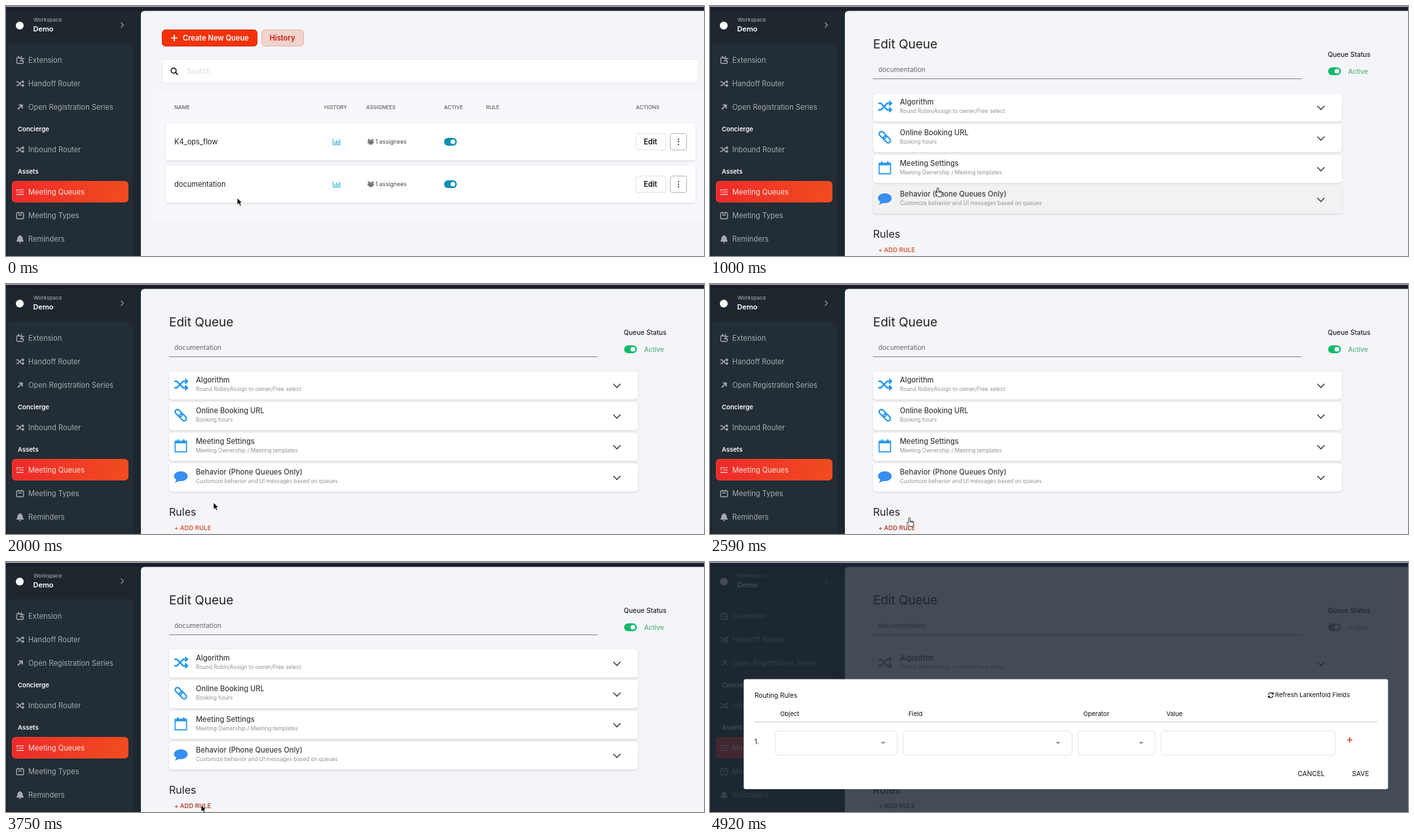
Animation, 1066 px wide and 383 px high, one loop 5 s. Source, as an HTML page:

```html
<!DOCTYPE html>
<html lang="en">
<head>
<meta charset="utf-8">
<title>Queue rules</title>
<style>
html, body { margin: 0; width: 100%; height: 100%; overflow: hidden; background: #1e272e; }
svg { display: block; width: 1066px; height: 383px; }
text { font-family: Inter, "Noto Sans", sans-serif; font-optical-sizing: none; white-space: pre; }
.card { filter: drop-shadow(0 1px 1.5px rgba(30, 40, 60, .17)); }
.dimmed { filter: grayscale(1); }
</style>
</head>
<body>
<svg id="stage" viewBox="0 0 1066 383"></svg>
<script>
const STEP = 5000 / 60;

// Text is placed by its left edge and the middle of its capitals.
const text = (x, cy, size, content, fill = '#222', weight = 400, extra = '') =>
  `<text x="${x}" y="${cy + size * .364}" font-size="${size}" fill="${fill}" font-weight="${weight}" ${extra}>${content}</text>`;
const box = (x, y, right, bottom, fill, radius = 0, extra = '') =>
  `<rect x="${x}" y="${y}" width="${right - x}" height="${bottom - y}" rx="${radius}" fill="${fill}" ${extra}/>`;
const line = (d, color, width = 1, extra = '') =>
  `<path d="${d}" fill="none" stroke="${color}" stroke-width="${width}" ${extra}/>`;
const at = (x, y, content, scale = 1) => `<g transform="translate(${x} ${y}) scale(${scale})">${content}</g>`;
const group = (id, content) => `<g id="${id}">${content}</g>`;
const toggle = (x, cy, fill) =>
  box(x, cy - 6, x + 19.5, cy + 6, fill, 6) + `<circle cx="${x + 13.5}" cy="${cy}" r="3.6" fill="#fff"/>`;

const round = 'stroke-linecap="round" stroke-linejoin="round"';
const icons = {
  plug: c => line('M0-4h-3.5q-1.5 0-1.5 1.5v6q0 1.5 1.5 1.5h7Q5 5 5 3.5V1M-2.5-6v3M2-6v3M0-2.5h6M3-2.5V1M0 1h4', c, 1.3, round),
  shuffle: c => line('M-5.8-2.8h2.5L2 2.8h3.3M-5.8 2.8h2.5L2-2.8h3.3M3.7-4.8l2 2-2 2M3.7.8l2 2-2 2', c, 1.4),
  arrow: c => line('M-3.5 3.5L3-3M-2-3.3h5.3V2', c, 1.8),
  list: c => line('M-2-3.5h7.5M-2 0h7.5M-5.5 3.7h11M-5.5-3.5l1 1 1.5-2M-5.5 0h1.5', c, 1.2),
  calendar: c => line('M-4-4h8q1.3 0 1.3 1.3v6.4Q5.3 5 4 5h-8q-1.3 0-1.3-1.3v-6.4Q-5.3-4-4-4zM-2.7-6v2M2.7-6v2M-2.7-.7h5.4', c, 1.4),
  bell: c => `<path fill="${c}" d="M-5.5 3.2Q-4 1.6-4-1.5-3.8-4.4-.8-5v-1H.8v1Q3.8-4.4 4-1.5 4 1.6 5.5 3.2V4h-11zM-1.7 4.8h3.4Q1.4 6.3 0 6.3T-1.7 4.8"/>`,
  chain: c => `<g transform="rotate(45)" stroke="${c}" stroke-width="2.1">` +
    box(-10.8, -3.5, 1.7, 3.5, 'none', 3.5) + box(-1.7, -3.5, 10.8, 3.5, 'none', 3.5) + '</g>',
  planner: c => line('M-8.7-7.2h17.4V9.2h-17.4z', c, 1.7, round) + line('M-8.7-5.2h17.4', c, 2.6) + line('M-4.5-10v4.5M4.5-10v4.5', c, 2.4),
  bubble: c => `<path fill="${c}" d="M0-8C6-8 10.5-4.8 10.5-.5S6 7 0 7q-1.6 0-3-.3-2.8 2.3-6.3 2.3Q-7.3 7-7 4.7-10.5 2.4-10.5-.5C-10.5-4.8-6-8 0-8"/>`,
  people: c => [-2.8, 0, 2.8].map(x =>
    `<circle cx="${x}" cy="${x ? -2.8 : -1.4}" r="1.6" fill="${c}"/>`).join('') +
    `<path fill="${c}" d="M-4.8 2V0q.5-1.3 2-1.1h5.6Q4.3-1.3 4.8 0v2H3v2.2h-6V2z"/>`,
  bars: c => line('M-5.5-5V4.7H6', c, 1) + line('M-2.8 3.5V0M-.3 3.5v-6M2.2 3.5V-.8M4.7 3.5v-7', c, 1.3),
  refresh: c => line('M-3.7-.7A3.7 3.7 0 0 1 3-2.3M3.7.7A3.7 3.7 0 0 1-3 2.3M3.6-4.3v2.6H1M-3.6 4.3V1.7H-1', c, 1.2)
};

function sidebar() {
  const items = [
    ['plug', 83, 'Extension'], ['shuffle', 119, 'Handoff Router'], ['arrow', 155, 'Open Registration Series'],
    ['shuffle', 220, 'Inbound Router'], ['list', 285, 'Meeting Queues'], ['calendar', 321, 'Meeting Types'], ['bell', 357, 'Reminders']
  ];
  return box(0, 0, 1066, 383, '#1e272e') + box(0, 0, 1066, 7, '#1b1d2b') +
    box(3, 57, 194, 400, '#222d35', 6) +
    '<circle cx="21" cy="30" r="6" fill="#fff"/>' +
    text(42, 21, 8, 'Workspace', '#9ba1a6', 500) + text(41.5, 35, 11, 'Demo', '#fff', 600) +
    line('M175.5 25.5l4 3.7-4 3.7', '#8c9298', 1.3) +
    text(18, 189, 9.6, 'Concierge', '#fff', 600) + text(18, 254, 9.6, 'Assets', '#fff', 600) +
    box(9.5, 268.5, 186.5, 300.5, 'url(#flame)', 5, 'stroke="#f2442a"') +
    items.map(([icon, y, label]) => {
      const color = label === 'Meeting Queues' ? '#fbe3dd' : '#a5acb1';
      return at(21.5, y, icons[icon](color)) + text(34, y, 11.1, label, color);
    }).join('');
}

function queueRow(cy, name) {
  return box(244, cy - 28, 1053, cy + 28.5, '#fff', 4, 'class="card"') +
    text(257, cy, 11.1, name) + at(505, cy, icons.bars('#27b6cd')) +
    at(557, cy, icons.people('#777')) + text(564, cy, 8.8, '1 assignees', '#444') +
    toggle(669, cy, '#0e8fb2') +
    box(962, cy - 12.5, 1008, cy + 12.5, '#fff', 3, 'stroke="#e1e2e6"') + text(974, cy, 11.1, 'Edit', '#111', 600) +
    box(1014.5, cy - 12.5, 1039.5, cy + 12.5, '#fff', 3, 'stroke="#b4b5ba"') +
    [-4, 0, 4].map(d => `<circle cx="1027" cy="${cy + d}" r="1.1" fill="#333"/>`).join('');
}

function listPage() {
  const headings = { NAME: 257, HISTORY: 486, ASSIGNEES: 550, ACTIVE: 669, RULE: 733, ACTIONS: 962 };
  return box(238.5, 36.5, 383.5, 61.5, '#f43209', 5, 'stroke="#cf2d0d"') +
    line('M252 49h10M257 44v10', '#fff', 1.7) + text(270, 49, 11.1, 'Create New Queue', '#fff', 600) +
    box(390.5, 36.5, 454.5, 61.5, '#f1d2cc', 5, 'stroke="#e7b3a9"') + text(402.5, 49, 11.1, 'History', '#cb1b10', 600) +
    box(238.5, 81.5, 1058, 118, '#fff', 4, 'stroke="#e7e8ee"') +
    '<circle cx="256" cy="99" r="3.8" fill="none" stroke="#222" stroke-width="1.8"/>' +
    line('M258.8 101.8l3.6 3.6', '#222', 2) + text(276, 100, 11.1, 'Search', '#dcdce1') +
    box(225, 128, 1066, 328, '#f7f8fb') +
    Object.entries(headings).map(([label, x]) => text(x, 155, 8, label, '#5d6067', 500)).join('') +
    queueRow(208, 'K4_ops_flow') + queueRow(273, 'documentation') +
    group('tooltip', box(295, 300, 402, 344, '#1b1d20', 2) + '<path d="M339.5 300.5l9-6 9 6z" fill="#1b1d20"/>' +
      text(348.5, 322, 10.1, 'documentation', '#fff', 500, 'text-anchor="middle"'));
}

function editPage() {
  const panels = [
    ['shuffle', 'Algorithm', 'Round Robin/Assign to owner/Free select', 1.75],
    ['chain', 'Online Booking URL', 'Booking hours', 1],
    ['planner', 'Meeting Settings', 'Meeting Ownership / Meeting templates', 1],
    ['bubble', 'Behavior (Phone Queues Only)', 'Customize behavior and UI messages based on queues', 1]
  ];
  return text(249, 58.5, 19, 'Edit Queue') + text(257, 97, 10.2, 'documentation', '#666') +
    line('M249 111.5h655', '#85868a') +
    text(943.5, 74.5, 10.1, 'Queue Status', '#222', 500) + toggle(944, 100, '#12ba6c') + text(974.5, 100, 10.1, 'Active', '#55b37c', 500) +
    panels.map(([icon, title, note, scale], i) => {
      const y = 134 + 47 * i;
      return box(249, y, 965, y + 43, '#fff', 5, `class="card" id="panel${i}"`) +
        at(267, y + 20, icons[icon](i === 3 ? '#368ff0' : '#2597ee'), scale) +
        text(290, y + 13, 11.1, title, '#3c3d40', 500) + text(290, y + 26.5, 8.25, note, '#929296') +
        line(`M927.5 ${y + 19}l5.5 5.5 5.5-5.5`, '#444', 1.6);
    }).join('') +
    text(249, 349.5, 16, 'Rules') + text(257, 374, 9.5, '+ ADD RULE', '#d9401f', 500, 'id="addRule"');
}

function modal() {
  const headings = { Object: 107, Field: 303, Operator: 570, Value: 697 };
  const fields = [[100, 286], [295, 553], [562, 680], [689, 955]];
  return box(0, 0, 1066, 383, '#1b2632', 0, 'opacity=".82"') +
    box(51.5, 179.5, 1035.5, 348, '#fff', 3) +
    group('form', text(68, 204, 10.1, 'Routing Rules', '#111') +
      at(856.5, 204, icons.refresh('#111')) + text(863, 204, 9.5, 'Refresh Larkenfold Fields', '#111') +
      Object.entries(headings).map(([label, x]) => text(x, 232.5, 9.5, label, '#111')).join('') +
      line('M68 245.2h951', '#e0e0e0', 2) + text(68, 275, 9.7, '1.', '#111') +
      fields.map(([x, right], i) => box(x, 259, right, 296, '#fff', 5, 'stroke="#e2e2e4"') +
        (i < 3 ? `<path d="M${right - 25} 275.5h7l-3.5 3.8z" fill="#999"/>` : '')).join('') +
      line('M973 272.5h8M977 268.5v8', '#d63f2c', 1.7) +
      text(897.5, 324, 10.2, 'CANCEL', '#111') + text(980.5, 324, 10.2, 'SAVE', '#111'));
}

const cursor =
  group('pointer', '<path d="M0 0v10.8l2.5-2.3 1.8 4 2-.9-1.8-3.9H8z" fill="#000" stroke="#fff" stroke-width=".9"/>') +
  group('hand', '<path d="M-1.3 7.8V1.2a1.3 1.3 0 0 1 2.6 0v3.9l4 .8q1.6.4 1.5 1.8l-.6 3-.6 2.8H.2L-3.8 8.3q-.5-1.2.7-1.4.9.1 1.8 1.2zM1.3 5v2.6M3.2 5.6v2.2M5 6.1v2" fill="#fff" stroke="#222" stroke-width=".9" stroke-linejoin="round"/>');

const stage = document.getElementById('stage');
stage.innerHTML =
  '<defs><linearGradient id="flame"><stop stop-color="#ee2a2c"/><stop offset="1" stop-color="#f04d1e"/></linearGradient></defs>' +
  sidebar() + '<path d="M206 383V13.5q0-6 6-6h854V383z" fill="#f4f5f9"/>' +
  group('list', listPage()) + group('edit', editPage()) + group('modal', modal()) +
  box(0, 0, 1066, 1.2, '#c3c4d2') + group('cursor', cursor);

const el = Object.fromEntries([...stage.querySelectorAll('[id]')].map(node => [node.id, node]));
const show = (node, visible) => node.setAttribute('visibility', visible ? 'inherit' : 'hidden');
const clamp = v => Math.max(0, Math.min(1, v));

// Cursor stops: time, x, y
const route = [
  [0, 353, 294], [333, 348, 279], [1500, 348, 278.5], [2083, 315, 338], [2583, 304.5, 358],
  [2667, 303.5, 360], [3083, 298, 371], [3750, 298, 372], [3833, 296, 370.5],
  [4500, 296, 370.5], [4583, 297, 371], [4750, 297, 371], [4833, 293, 375], [4916, 288, 392], [5001, 288, 392]
];

function cursorAt(t) {
  const i = route.findIndex(stop => stop[0] > t);
  const [t0, x0, y0] = route[i - 1], [t1, x1, y1] = route[i];
  const p = (t - t0) / (t1 - t0), eased = p * p * (3 - 2 * p);
  return [x0 + (x1 - x0) * eased, y0 + (y1 - y0) * eased];
}

function draw(now) {
  const t = Math.floor((now % 5000) / STEP + 1e-6) * STEP;
  const [x, y] = cursorAt(t);
  const editing = t > 910, open = t > 3820;
  const overPanel = editing && y < 318, overRule = editing && y > 355;

  show(el.list, !editing);
  show(el.edit, editing);
  show(el.modal, open);
  el.edit.classList.toggle('dimmed', open);
  el.tooltip.setAttribute('opacity', clamp((t - 165) / 165));
  el.form.setAttribute('opacity', clamp(.45 + (t - 3833) / 300));
  el.panel3.setAttribute('fill', overPanel ? '#f2f2f2' : '#fff');
  el.addRule.setAttribute('fill', overRule ? '#a82a18' : '#d9401f');

  const hand = t > 160 && t < 3660 && (!editing || overPanel || overRule);
  show(el.hand, hand);
  show(el.pointer, !hand);
  el.cursor.setAttribute('transform', `translate(${x} ${y})`);
}

let start;
function tick(now) {
  start ??= now;
  draw(now - start);
  requestAnimationFrame(tick);
}
draw(0);
requestAnimationFrame(tick);
</script>
</body>
</html>
```
